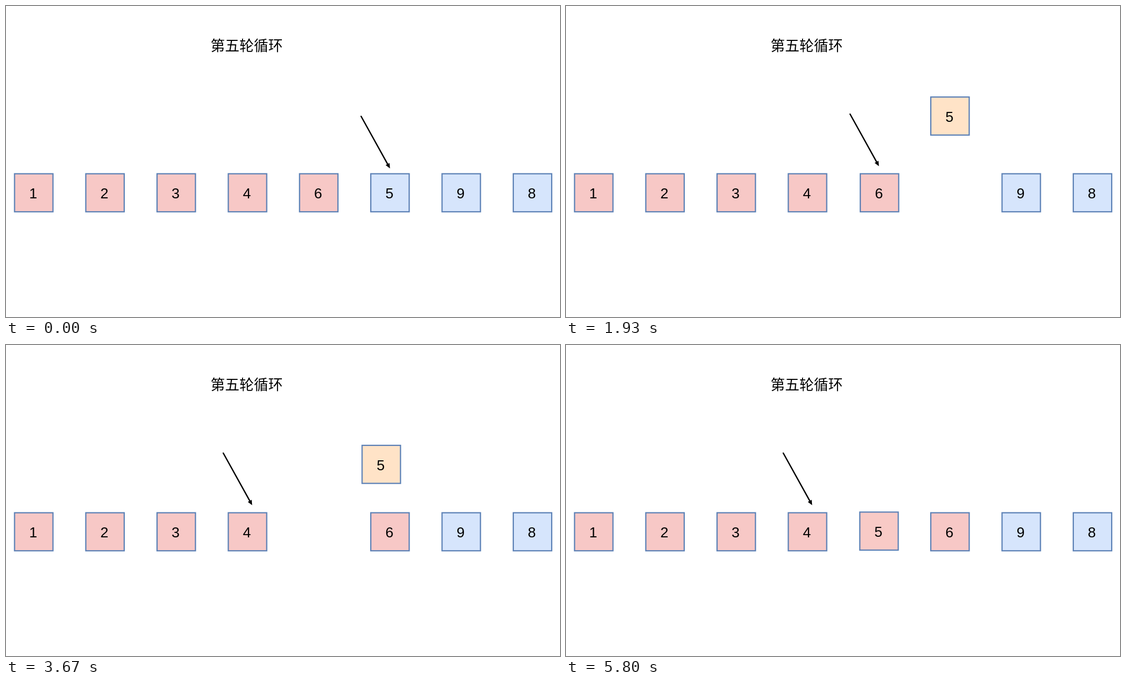
An HTML page that plays this animation: 998x561 px, repeating every 6670 ms.

```html
<!DOCTYPE html>
<html lang="zh-CN">
<head>
<meta charset="utf-8">
<title>第五轮循环</title>
<style>
  html, body { margin: 0; width: 100%; height: 100%; overflow: hidden; background: #fff; }
  svg { display: block; width: 998px; height: 561px; }
  text { font: 26px "Noto Sans CJK SC", "Noto Sans CJK", sans-serif; text-anchor: middle; }
  .digit { font-family: "Liberation Sans", Arial, sans-serif; }
  rect { stroke: #5c81b6; stroke-width: 2.2; }
</style>
</head>
<body>
<svg id="stage" viewBox="0 0 998 561">
  <text x="433.5" y="81">第五轮循环</text>
  <g id="arrow">
    <path d="M0 0L48 86.6" stroke="#000" stroke-width="2.4" stroke-linecap="round"/>
    <path d="M52 94L51.2 84.2L44.2 88.1Z"/>
  </g>
</svg>
<script>
const LOOP = 6670;
const FIRST_START = 270;
const STEP = 1500;
const PITCH = 128.35;
const ROW_Y = 302.6;
const RED = [247, 200, 198], BLUE = [214, 229, 252], ORANGE = [255, 227, 199];

const stage = document.getElementById('stage');
const arrow = document.getElementById('arrow');
const slotX = index => 15.4 + PITCH * index;
const rgb = color => `rgb(${color})`;
const mix = (from, to, amount) => from.map((v, i) => v + (to[i] - v) * amount);

function add(parent, tag, attributes) {
  const node = document.createElementNS('http://www.w3.org/2000/svg', tag);
  for (const name in attributes) node.setAttribute(name, attributes[name]);
  return parent.appendChild(node);
}

function place(node, [x, y]) {
  node.setAttribute('transform', `translate(${x} ${y})`);
}

function makeCard(digit, slot, color) {
  const group = add(stage, 'g', {});
  const box = add(group, 'rect', { width: 69.2, height: 68.6, fill: rgb(color) });
  add(group, 'text', { x: 33.5, y: 44.5, class: 'digit' }).textContent = digit;
  place(group, [slotX(slot), ROW_Y]);
  return { group, box };
}

[1, 2, 3, 4].forEach((digit, slot) => makeCard(digit, slot, RED));
makeCard(9, 6, BLUE);
makeCard(8, 7, BLUE);
const six = makeCard(6, 4, RED);
const five = makeCard(5, 5, BLUE);

// Eased progress of one of the consecutive steps.
function progress(time, step, duration = STEP) {
  const u = Math.min(1, Math.max(0, (time - FIRST_START - step * STEP) / duration));
  return u * u * u * (u * (6 * u - 15) + 10);
}

function draw(time) {
  const lift = progress(time, 0);
  const shift = progress(time, 1);
  const insert = progress(time, 2);
  const settle = progress(time, 3, 1300);

  const aboveSix = mix([639.7, 199], [513, 195], lift);
  place(arrow, mix(aboveSix, [391.4, 195], shift));
  place(six.group, [slotX(4 + shift), ROW_Y]);

  const lifted = mix([slotX(5), ROW_Y], [slotX(5), 164.2], lift);
  place(five.group, mix(lifted, [529.3, 301.4], insert));
  five.box.setAttribute('fill', rgb(mix(mix(BLUE, ORANGE, lift), RED, settle)));
}

function tick() {
  draw(performance.now() % LOOP);
  requestAnimationFrame(tick);
}
tick();
</script>
</body>
</html>
```
